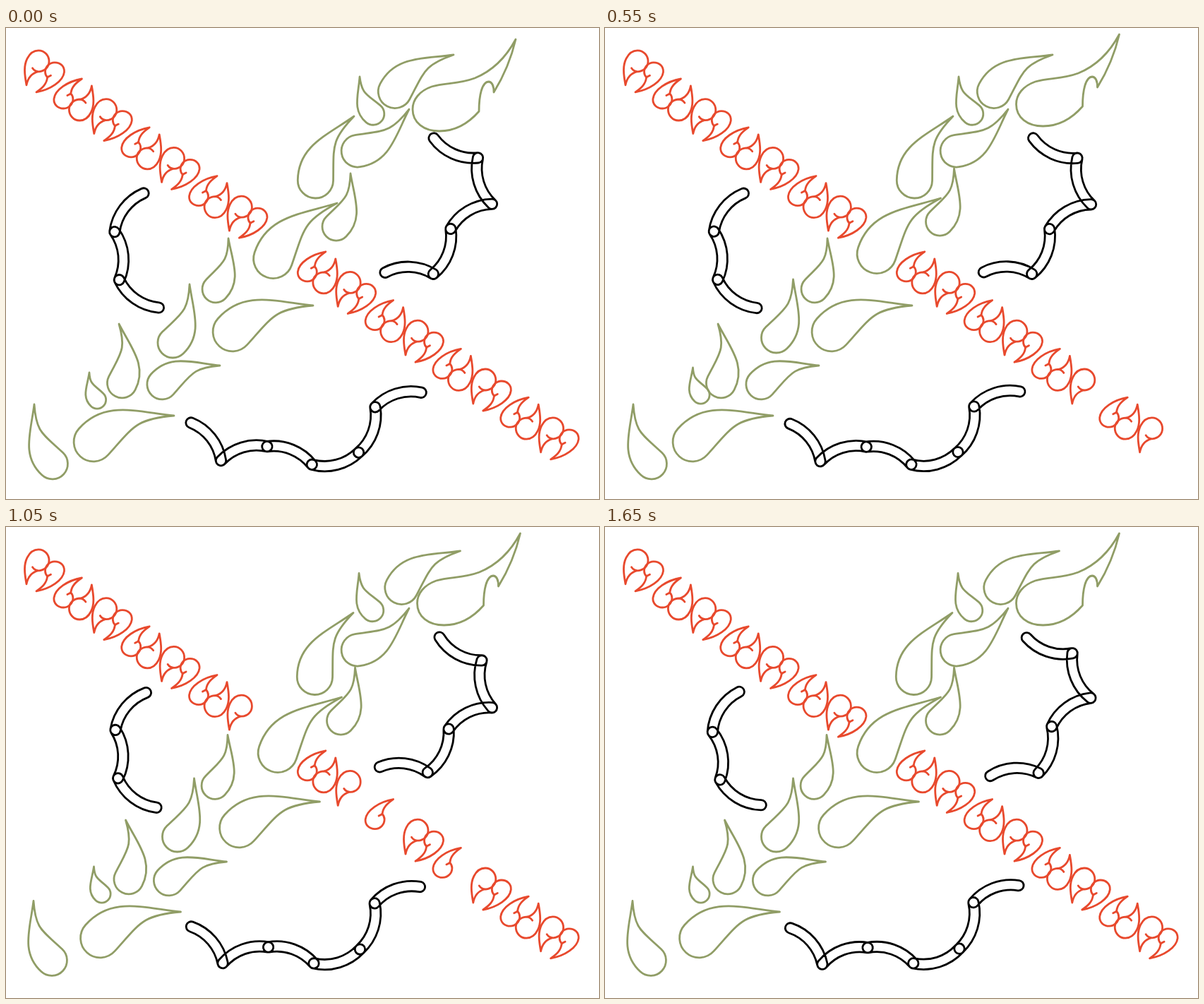
Animation, 840 px wide and 667 px high, one loop 1.7 s. Source, as an HTML page with a canvas:

```html
<!DOCTYPE html>
<html lang="en">
<head>
<meta charset="utf-8">
<title>Drops and chains</title>
<style>
html, body { margin: 0; width: 100%; height: 100%; overflow: hidden; background: #fff; }
canvas { display: block; }
</style>
</head>
<body>
<canvas id="stage" width="840" height="667"></canvas>
<script>
const ctx = document.getElementById('stage').getContext('2d');
const LOOP = 1700, STEP = 50;
const RED = '#e8492d', GREEN = '#909d66', BLACK = '#000';
const rad = deg => deg * Math.PI / 180;

// One leaf shape for all: tip x, tip y, direction to the bulb, size (negative is mirrored).
const leafGroups = [
  { at: 400, shift: [6.5, -7], leaves: [
    [118, 488, 74, 40], [260, 363, 106, -86], [469, 248, 139, 120], [488, 206, 105, -78]
  ] },
  { at: 650, shift: [-1, -3.5], leaves: [
    [40, 533, 73, 88], [315, 298, 104, -74], [493, 125, 121, 106], [501, 69, 70, 56]
  ] },
  { at: 900, shift: [9.5, -4], leaves: [
    [238, 549, 162, 120], [160, 419, 87, -84], [303, 478, 162, 86],
    [435, 393, 162, 120], [634, 38, 148, 98]
  ] },
  { at: Infinity, shift: [0, 0], leaves: [[571, 115, 141, -94]] }
];

const head = new Path2D(
  'M722 16 C707 44 686 62 664 71 C640 80 622 77 603 83 C586 89 576 101 576 115 ' +
  'C576 134 592 146 614 146 C638 146 656 134 670 118 ' +
  'C670 96 674 76 684 76 C690 77 691 85 691 91 C707 65 716 42 722 16 Z');

function leafPath([x, y, angle, size]) {
  const length = Math.abs(size), r = 5 + 0.19 * length, lean = rad(-30);
  const side = (sign, tipAngle, pull) => {
    const ex = length - sign * r * Math.sin(lean), ey = sign * r * Math.cos(lean);
    const reach = pull * Math.hypot(ex, ey);
    return [
      reach * Math.cos(rad(tipAngle)), reach * Math.sin(rad(tipAngle)),
      ex - reach * Math.cos(lean), ey - reach * Math.sin(lean), ex, ey
    ];
  };
  const outer = side(1, 24, 0.4), inner = side(-1, 13, 0.5);
  const local = new Path2D();
  local.moveTo(0, 0);
  local.bezierCurveTo(...outer);
  local.arc(length, 0, r, lean + Math.PI / 2, lean - Math.PI / 2, true);
  local.bezierCurveTo(inner[2], inner[3], inner[0], inner[1], 0, 0);
  local.closePath();
  const path = new Path2D();
  path.addPath(local, new DOMMatrix().translate(x, y).rotate(angle).scale(1, Math.sign(size)));
  return path;
}
for (const group of leafGroups) group.paths = group.leaves.map(leafPath);
leafGroups[0].paths.push(head);

const commas = [
  new Path2D('M-26 19.5 C-29 3 -30 -8 -25 -18 C-21 -26 -15 -29.5 -9 -29.5 ' +
    'C0 -29.5 6 -22 6 -14 C6 -6 0 0 -8.5 0.5 C-13 0.5 -15.5 -1.5 -17.5 -4.5 ' +
    'M-26 19.5 C-24 9 -19 3 -10 0.5'),
  new Path2D('M-12 29.5 C8 26 26 14 27.5 1 C28 -7 22 -12.5 14 -12.5 ' +
    'C6 -12.5 0.5 -6 0.5 1 C0.5 4 2 7 4 9 ' +
    'M-12 29.5 C-4 24 3 18 3.5 8.5 L8.5 6')
];

// Commas come in evenly spaced pairs; every other pair is turned half way round.
function commaRow(x, y, first, count) {
  return Array.from({ length: count }, (_, i) => {
    const turned = (first + i) % 2;
    return { turned, x: x + 47.9 * i - 7.5 * turned, y: y + 34.4 * i + 5.8 * turned };
  });
}
const pairs = [...commaRow(55, 61.3, 0, 7), ...commaRow(448.3, 340.5, 7, 8)];

// Gaps run along the rows, one comma after another.
const GAP_TIME = 275, GAPS_END = 1600;
const waves = [
  { first: 29, stride: -4, count: 4, start: 369, delay: 136 },
  { first: 27, stride: -4, count: 4, start: 774, delay: 136 },
  { first: 28, stride: -4, count: 4, start: 1179, delay: 136 },
  { first: 9, stride: 4, count: 2, start: 600, delay: 235 },
  { first: 1, stride: 4, count: 2, start: 1070, delay: 235 },
  { first: 2, stride: -2, count: 2, start: 1180, delay: 275 }
];

function hiddenCommas(t) {
  const hidden = new Set();
  if (t >= GAPS_END) return hidden;
  for (const { first, stride, count, start, delay } of waves)
    for (let i = 0; i < count; i++) {
      const age = t - start - i * delay;
      if (age >= 0 && age < GAP_TIME) hidden.add(first + i * stride);
    }
  return hidden;
}

// Chains of equal links, given by link directions; swing holds key angles in degrees.
const LINK = 68.4;
const swingTimes = [0, 200, 550, 750, 1050, 1450, 1650];
const chains = [
  { start: [195, 234], pivot: [182, 315], bends: '-+-', headings: [127, 84.5, 35],
    swing: [0, 2.1, 1, 2.6, 2.4, 1, -3.4] },
  { start: [606, 156], pivot: [610, 252], bends: '---+-', headings: [24, 73, 149, 111, 181.7],
    swing: [0, 1.2, 0.4, 1.4, 4.8, 0.6, -5.2] },
  { start: [262, 559], pivot: [428, 554], bends: '+++--+', headings: [51.6, -17, 22, -14.5, -70, -17.5],
    swing: [0, -0.6, -0.5, -1.8, -2.4, -0.2, -3.1] }
];

function addLink(path, x0, y0, x1, y1, bend) {
  const R = 69, w = 7.2, depth = bend * Math.sqrt(R * R - LINK * LINK / 4);
  const cx = (x0 + x1) / 2 - depth * (y1 - y0) / LINK;
  const cy = (y0 + y1) / 2 + depth * (x1 - x0) / LINK;
  const a0 = Math.atan2(y0 - cy, x0 - cx), a1 = Math.atan2(y1 - cy, x1 - cx);
  const half = bend * Math.PI, back = bend < 0;
  path.moveTo(cx + (R + w) * Math.cos(a0), cy + (R + w) * Math.sin(a0));
  path.arc(cx, cy, R + w, a0, a1, back);
  path.arc(x1, y1, w, a1, a1 + half, back);
  path.arc(cx, cy, R - w, a1, a0, !back);
  path.arc(x0, y0, w, a0 + half, a0 + 2 * half, back);
  path.closePath();
}

function chainPath({ start: [x, y], headings, bends }) {
  const path = new Path2D();
  headings.forEach((heading, i) => {
    const nx = x + LINK * Math.cos(rad(heading)), ny = y + LINK * Math.sin(rad(heading));
    addLink(path, x, y, nx, ny, bends[i] === '+' ? 1 : -1);
    [x, y] = [nx, ny];
  });
  return path;
}
for (const chain of chains) chain.path = chainPath(chain);

function swingAt(angles, t) {
  const i = swingTimes.findIndex(time => time >= t);
  if (i <= 0) return angles[0];
  const u = (t - swingTimes[i - 1]) / (swingTimes[i] - swingTimes[i - 1]);
  const eased = (1 - Math.cos(Math.PI * u)) / 2;
  return angles[i - 1] + (angles[i] - angles[i - 1]) * eased;
}

function strokeAt(paths, x, y, angle = 0) {
  ctx.save();
  ctx.translate(x, y);
  ctx.rotate(angle);
  for (const path of paths) ctx.stroke(path);
  ctx.restore();
}

function drawLeaves(t) {
  ctx.strokeStyle = GREEN;
  for (const { at, shift, paths } of leafGroups)
    strokeAt(paths, ...(t >= at ? shift : [0, 0]));
}

function drawCommas(t) {
  const hidden = hiddenCommas(t);
  ctx.strokeStyle = RED;
  pairs.forEach(({ x, y, turned }, k) => {
    const shown = [0, 1].filter(j => !hidden.has(2 * k + j));
    strokeAt(shown.map(j => commas[j ^ turned]), x, y, turned * Math.PI);
  });
}

function drawChains(t) {
  ctx.strokeStyle = BLACK;
  for (const { pivot: [x, y], path, swing } of chains) {
    ctx.save();
    ctx.translate(x, y);
    ctx.rotate(rad(swingAt(swing, t)));
    strokeAt([path], -x, -y);
    ctx.restore();
  }
}

function render(now) {
  const t = Math.floor((now % LOOP) / STEP) * STEP;
  ctx.fillStyle = '#fff';
  ctx.fillRect(0, 0, 840, 667);
  ctx.lineWidth = 2.8;
  ctx.lineCap = ctx.lineJoin = 'round';
  drawLeaves(t);
  drawCommas(t);
  drawChains(t);
}

const start = performance.now();
function loop() {
  render(performance.now() - start);
  requestAnimationFrame(loop);
}
loop();
</script>
</body>
</html>
```
